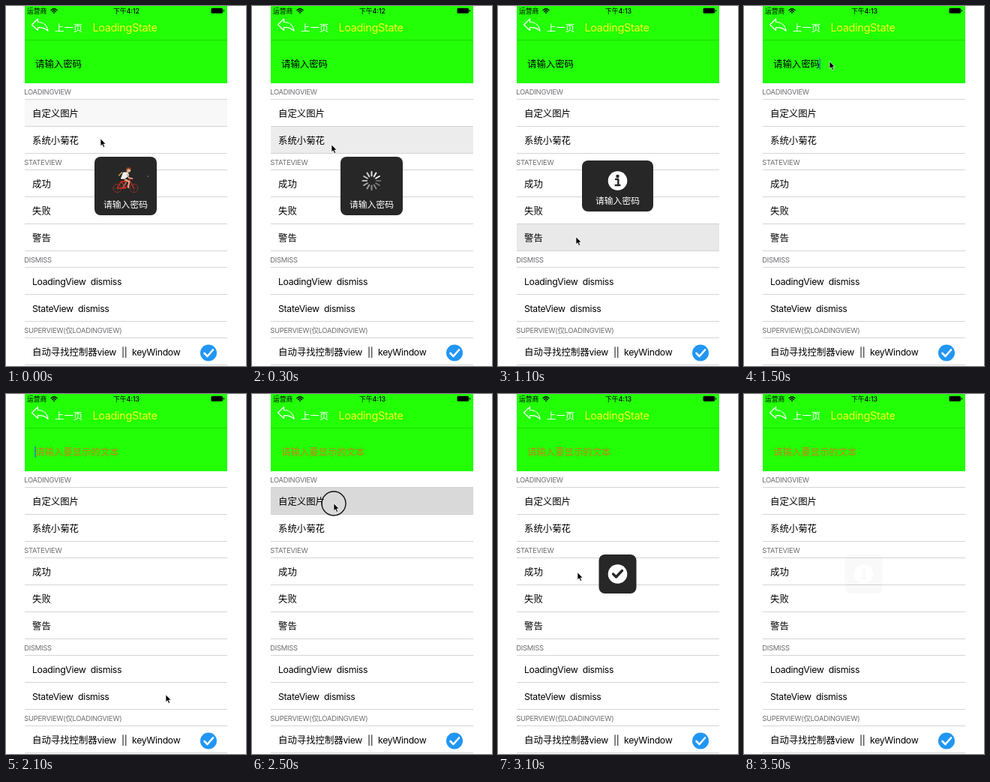
These frames come from a looping animation (320 px wide and 480 px high, 3600 ms). An HTML page:

```html
<!DOCTYPE html>
<html lang="zh-CN">
<head>
<meta charset="utf-8">
<style>
html, body { margin: 0; width: 100%; height: 100%; overflow: hidden; background: #fff; }
svg { display: block; width: 320px; height: 480px; }
text { font-family: Inter, 'Noto Sans CJK SC', 'Noto Sans CJK', 'Noto Sans', sans-serif; white-space: pre; }
</style>
</head>
<body>
<svg id="stage" viewBox="0 0 320 480"></svg>
<script>
const LOOP = 3600, STEP = 100, GREEN = '#22ff06', DARK = '#272727';
const MESSAGE = '请输入密码';
const stage = document.getElementById('stage');

const text = (x, y, s, size = 12.4, fill = '#000', spacing = 0, extra = '') =>
  `<text x="${x}" y="${y}" font-size="${size}" fill="${fill}" letter-spacing="${spacing}" ${extra}>${s}</text>`;
const latin = (x, y, s) => text(x, y, s, 12.24, '#000', -0.3);
const rect = (x, y, w, h, fill, r = 0) =>
  `<rect x="${x}" y="${y}" width="${w}" height="${h}" rx="${r}" fill="${fill}"/>`;
const circle = (x, y, r, fill, extra = '') =>
  `<circle cx="${x}" cy="${y}" r="${r}" fill="${fill}" ${extra}/>`;
const path = (d, stroke, w = 1, fill = 'none') =>
  `<path d="${d}" stroke="${stroke}" stroke-width="${w}" fill="${fill}" stroke-linecap="round" stroke-linejoin="round"/>`;
const group = (transform, body, extra = '') => `<g transform="${transform}" ${extra}>${body}</g>`;

// Row tops of the table, in the order they can be tapped
const rowTops = [125, 161, 219, 255, 291, 349, 385, 443];
const lines = [124, 160, 196, 218, 254, 290, 326, 348, 384, 420, 442, 478];

// [time, x, y]
const pointer = [[0, 126, 177], [100, 108, 180], [500, 104, 190], [600, 101, 240],
  [700, 101, 281], [900, 101, 281], [1000, 104, 308], [1200, 104, 308], [1400, 114, 74],
  [1900, 114, 74], [2100, 213, 401], [2300, 190, 350], [2500, 109, 146], [2600, 109, 146],
  [2700, 109, 181], [2900, 109, 181], [3000, 106, 238], [3100, 106, 238], [3200, 106, 275],
  [3300, 106, 275], [3400, 106, 310]];
const clicks = [200, 600, 800, 1000, 1400, 2500, 2700, 3000, 3200, 3400];
// [start, end, row, colour]
const highlights = [[0, 100, 0, '#f8f8f8'], [200, 300, 1, '#d9d9d9'], [300, 400, 1, '#ececec'],
  [600, 800, 2, '#d9d9d9'], [800, 900, 3, '#d9d9d9'], [900, 1000, 3, '#ececec'],
  [1000, 1100, 4, '#d9d9d9'], [1100, 1200, 4, '#e9e9e9'], [2500, 2600, 0, '#d9d9d9'],
  [2800, 2900, 1, '#d9d9d9'], [3000, 3100, 2, '#d9d9d9'], [3200, 3300, 3, '#d9d9d9'],
  [3400, 3500, 4, '#d9d9d9']];
// [start, end, icon, opacity]
const huds = [[0, 300, 'bike', 1], [300, 600, 'spinner', 1], [600, 800, 'ok', 1],
  [800, 1000, 'fail', 1], [1000, 1200, 'info', 1], [1200, 1300, 'info', 0.4],
  [2600, 2800, 'bike', 1], [2800, 3000, 'spinner', 1], [3000, 3200, 'ok', 1],
  [3200, 3400, 'fail', 1], [3400, 3500, 'info', 1], [3500, 3600, 'info', 0.025]];
// [width, height] with a message, then without
const sizes = { bike: [83, 78, 69, 65], spinner: [83, 78, 62, 62], other: [95, 68, 50, 52] };
const active = (list, t) => list.find(e => t >= e[0] && t < e[1]);

function bike(t) {
  const a = t / 100 * 0.9, px = 3.5 * Math.cos(a), py = 3.5 * Math.sin(a);
  const wheel = x => group(`translate(${x} 10) rotate(${t / 3})`,
    circle(0, 0, 5.6, 'none', 'stroke="#8d3029" stroke-width="1"') +
    path('M-5 0H5M0-5V5', '#55423f', 0.5));
  const leg = (s, color) =>
    path(`M-4-3L${3 + s * px / 2} ${1 + s * py / 2}L${s * px} ${9 + s * py}`, color, 2);
  return wheel(-11) + wheel(11) + leg(-1, '#9a6b55') +
    path('M-11 10L-6 1L6 1L0 10H-11M-6 1L0 10M6 1L11 10M6 1L5-3H9', '#d92b20', 1.3) +
    leg(1, '#e1b08b') + path('M-7-2H-2', '#111', 2) +
    path('M-6-3L-3-11L3-11L4-7L-1-3Z', '#eee', 1, '#eee') +
    path('M2-9L4-4L9-3', '#e4b18d', 1.5) + path('M-5-11L-9-7', '#d9a13c', 1.5) +
    circle(4, -14, 2.8, '#e8b58e') + path('M1-14Q2-18 6-16', '#914824', 2) +
    circle(30, -6, 0.6, '#ddd');
}

function spinner(t) {
  let s = '';
  for (let i = 0; i < 12; i++) {
    const age = (i - Math.floor(t / 100) + 120) % 12;
    s += group(`rotate(${i * 30})`, path('M0-6.5V-12', '#fff', 2), `opacity="${0.3 + age * 0.063}"`);
  }
  return s;
}

const badges = {
  ok: path('M-6 0L-2 4L6-4.5', DARK, 3.3),
  fail: path('M-4.5-4.5L4.5 4.5M4.5-4.5L-4.5 4.5', DARK, 3.2),
  info: rect(-2, -8, 4, 4, DARK, 1) + path('M-2.5-2H.8V5.5M-2.8 6H3', DARK, 2.4)
};

function hud(t) {
  const h = active(huds, t);
  if (!h) return '';
  const [, , kind, alpha] = h, labelled = t < 1600;
  const size = sizes[kind] || sizes.other;
  const [w, height] = labelled ? size : size.slice(2);
  const icon = kind == 'bike' ? bike(t) : kind == 'spinner' ? spinner(t)
    : circle(0, 0, 12.8, '#fff') + badges[kind];
  const label = labelled
    ? text(159.5, size == sizes.other ? 263.5 : 269, MESSAGE, 11.8, '#fff', 0, 'text-anchor="middle"') : '';
  return group('', rect(159.5 - w / 2, 240 - height / 2, w, height, DARK, 8) +
    group(`translate(159.5 ${labelled ? 233 : 240})`, icon) + label, `opacity="${alpha}"`);
}

function cursor(t) {
  if (t >= 3500) return '';
  const n = pointer.findIndex(p => p[0] > t);
  const a = pointer[n < 0 ? pointer.length - 1 : n - 1], b = n < 0 ? a : pointer[n];
  const k = (t - a[0]) / (b[0] - a[0] || 1);
  const x = a[1] + (b[1] - a[1]) * k, y = a[2] + (b[2] - a[2]) * k;
  return group(`translate(${x} ${y})`,
    (clicks.includes(t) ? circle(0, 0, 16, 'none', 'stroke="#111" stroke-width="1.4"') : '') +
    path('M0 0V9.8L2.2 7.7L3.8 11.4L5.6 10.6L4 7.1H7Z', '#fff', 0.7, '#000'));
}

function field(t) {
  const left = t < 1600 ? 5 : Math.max(0, 4 - (t - 1600) / STEP);
  const caret = t >= 1400 && t < 2300 ? rect(38.4 + left * 12.4, 70, 1.3, 14.5, '#2868d8') : '';
  return (left ? text(39, 81.5, MESSAGE.slice(0, left))
    : text(39, 81.5, '请输入要显示的文本', 12.4, '#c6801c')) + caret;
}

const header = (t) => rect(25, 0, 270, 103, GREEN) + rect(25, 45, 270, 0.8, '#1cd408') +
  text(28, 9.5, '运营商', 8.8) +
  path('M60 5.5Q64 2 68 5.5M61.6 7.4Q64 5.2 66.4 7.4', '#000', 1.4) + circle(64, 9, 1, '#000') +
  text(160.5, 9.5, '下午4:1' + (t < 400 ? 2 : 3), 8.8, '#000', 0, 'text-anchor="middle" font-weight="500"') +
  rect(273.5, 2.8, 15.5, 7, '#000', 1.6) + rect(289.8, 5, 1.2, 2.6, '#000', 0.6) +
  path('M34.5 25L42.5 17.2V21.5C50 21.5 55 26 56 33.5C53 29.5 48.5 28.3 42.5 28.6V32.5Z', '#fff', 1.2) +
  text(65, 34, '上一页', 12.4, '#fff') + text(115.5, 34, 'LoadingState', 14.4, '#fbff1c', -0.3);

const table = [['LOADINGVIEW', 114], ['STATEVIEW', 208], ['DISMISS', 338], ['SUPERVIEW(仅LOADINGVIEW)', 432]]
  .map(([s, y]) => text(24.2, y + 3.5, s, 9.4, '#6d6d72', -0.25)).join('') +
  lines.map(y => rect(25, y, 270, 0.8, '#cbcbce')).join('') +
  ['自定义图片', '系统小菊花', '成功', '失败', '警告']
    .map((s, i) => text(35, rowTops[i] + 22.5, s)).join('') +
  latin(35, 371.5, 'LoadingView  dismiss') + latin(35, 407.5, 'StateView  dismiss') +
  text(35, 465.5, '自动寻找控制器') + latin(121.5, 465.5, 'view') +
  latin(154, 465.5, '||') + latin(168, 465.5, 'keyWindow') +
  circle(270, 462.5, 11, '#2196f3') + path('M264.5 463L268.5 467L276 458.5', '#fff', 2.6);

let shown = -1;
function draw(now) {
  const t = Math.floor(now % LOOP / STEP) * STEP;
  if (t != shown) {
    shown = t;
    const mark = active(highlights, t);
    stage.innerHTML = header(t) + field(t) +
      (mark ? rect(25, rowTops[mark[2]] - 0.5, 270, 36, mark[3]) : '') +
      table + hud(t) + cursor(t);
  }
}
const start = performance.now();
function tick() {
  draw(performance.now() - start);
  requestAnimationFrame(tick);
}
tick();
</script>
</body>
</html>
```
